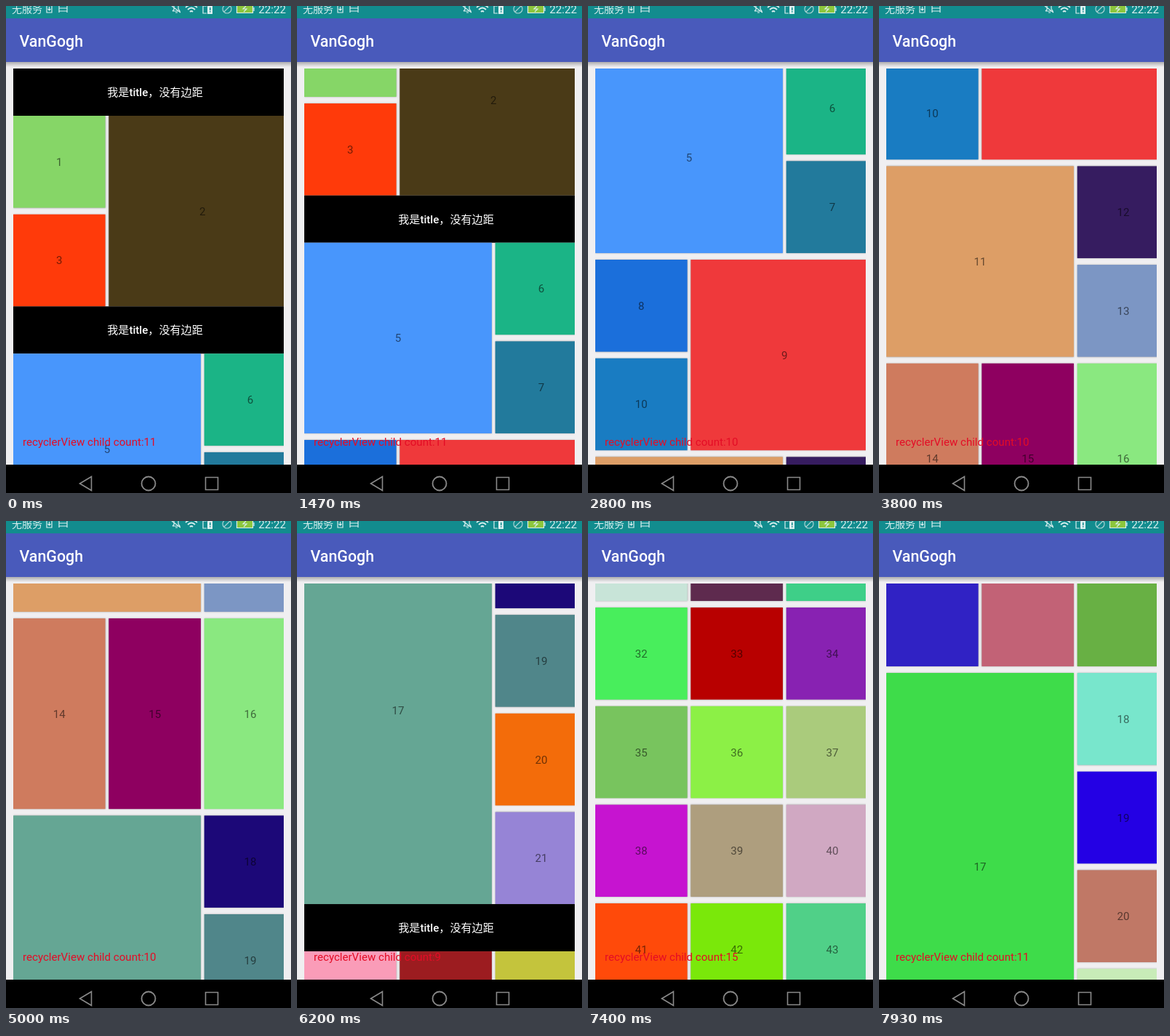
Recreate the animation shown at these times as an HTML page with a canvas. Size 392 px wide and 670 px high, loop 8 s.

```html
<!DOCTYPE html>
<html lang="zh-CN">
<head>
<meta charset="utf-8">
<title>VanGogh</title>
<style>
  html, body { margin: 0; width: 100%; height: 100%; overflow: hidden; background: #f0eff1; }
  canvas { display: block; }
</style>
</head>
<body>
<canvas id="stage" width="392" height="670"></canvas>
<script>
const ctx = document.getElementById('stage').getContext('2d');
const FONT = 'Roboto, "Noto Sans CJK SC", "Noto Sans CJK", sans-serif';
const LOOP = 8000, STEP = 1000 / 15;
const LIST = { x: 10, y: 86, right: 382, bottom: 631 };
const CELL = 126.6, COL = 131.33, ROW = 135.67, TITLE_HEIGHT = 65;

// Each block lists its cells as [column, row, columns, rows].
const BLOCKS = {
  bigRight: [[0, 0, 1, 1], [1, 0, 2, 2], [0, 1, 1, 1]],
  bigLeft: [[0, 0, 2, 2], [2, 0, 1, 1], [2, 1, 1, 1]],
  tall: [[0, 0, 1, 2], [1, 0, 1, 2], [2, 0, 1, 2]],
  tower: [[0, 0, 2, 4], [2, 0, 1, 1], [2, 1, 1, 1], [2, 2, 1, 1], [2, 3, 1, 1]],
  row: [[0, 0, 1, 1], [1, 0, 1, 1], [2, 0, 1, 1]]
};
const ORDER = ['title', 'bigRight', 'title', 'bigLeft', 'bigRight', 'bigLeft', 'tall', 'tower', 'title',
  ...Array(9).fill('row')];

const hexList = text => text.trim().split(/\s+/).map(hex => '#' + hex);
const COLORS = hexList(`
  000000 86d667 4a3a17 ff3a0a 000000 4896fc 1bb486 227a9c 1b6fdb ef393b 197cc2
  dd9e66 361c60 7c96c4 cf7b5e 8e0060 8ae880 65a694 1c0878 50868a f36c0a 9684d6
  000000 fa9cb8 9c1c20 c4c43c 5c8ed0 e0b050 7a4a98 c8e4d8 5e2a4e 3ecf88
  48ee5c b80000 8822b2 78c45e 8cf046 aacb7c c614d0 ae9e7e d0a8c2 ff4a0a 7ae80a 50d088`);
// Cells get fresh colours when they are bound again on the way back.
const REBOUND_FROM = 14, REBOUND_TO = 28, TURN = 111;
const REBOUND = hexList(`
  3022c4 c26276 68b044 3edc4a 78e6cc 2400e4 c07866 c8ecb8
  000000 5a9ad8 d8b23c 8a3ca0 3fae9a e07048 70709c`);

const SCROLL = [[0, 0], [22, 152.6], [42, 400.6], [57, 800.6], [93, 1570.2], [111, 2450.2], [119, 1354.6]];
const COUNTS = [[0, 11], [32, 10], [80, 9], [97, 12], [104, 15], [114, 12], [117, 11]];

function buildItems() {
  const items = [];
  let top = LIST.y;
  ORDER.forEach((kind, i) => {
    if (kind === 'title') {
      items.push({ title: true, x: LIST.x, y: top, w: 390, h: TITLE_HEIGHT });
      top += TITLE_HEIGHT;
      return;
    }
    const cells = BLOCKS[kind];
    for (const [col, row, cols, rows] of cells) {
      items.push({
        x: LIST.x + col * COL, y: top + row * ROW,
        w: CELL + (cols - 1) * COL, h: CELL + (rows - 1) * ROW
      });
    }
    top += Math.max(...cells.map(c => c[1] + c[3])) * ROW;
    if (ORDER[i + 1] === 'title') top -= ROW - CELL;
  });
  return items;
}
const items = buildItems();

const slopes = SCROLL.slice(1).map(([f, s], i) => (s - SCROLL[i][1]) / (f - SCROLL[i][0]));
function tangent(i) {
  if (i === 0) return 0;
  const a = slopes[i - 1], b = slopes[i];
  if (b === undefined) return a;
  return a * b > 0 ? 2 * a * b / (a + b) : 0;
}
function scrollAt(frame) {
  let i = 0;
  while (i < SCROLL.length - 2 && frame >= SCROLL[i + 1][0]) i++;
  const [f0, s0] = SCROLL[i], [f1, s1] = SCROLL[i + 1];
  const span = f1 - f0, u = Math.min(1, (frame - f0) / span);
  const ease = u * u * (3 - 2 * u);
  return s0 + (s1 - s0) * ease
    + span * (tangent(i) * u * (1 - u) ** 2 - tangent(i + 1) * u * u * (1 - u));
}

function text(value, x, y, color, size = 15, align = 'center', weight = 400) {
  ctx.font = `${weight} ${size}px ${FONT}`;
  ctx.textAlign = align;
  ctx.fillStyle = color;
  ctx.fillText(value, x, y);
}
function box(x, y, w, h, color) {
  ctx.fillStyle = color;
  ctx.fillRect(x, y, w, h);
}
function line(path, color, width) {
  ctx.strokeStyle = color;
  ctx.lineWidth = width;
  ctx.stroke(new Path2D(path));
}

function colorOf(index, frame) {
  const rebound = frame > TURN && index >= REBOUND_FROM && index <= REBOUND_TO;
  return rebound ? REBOUND[index - REBOUND_FROM] : COLORS[index] || '#8098b0';
}

function drawList(frame) {
  const scroll = scrollAt(frame);
  ctx.save();
  ctx.beginPath();
  ctx.rect(LIST.x, LIST.y, LIST.right - LIST.x, LIST.bottom - LIST.y);
  ctx.clip();
  items.forEach((item, index) => {
    const top = item.y - scroll;
    if (top + item.h < LIST.y || top > LIST.bottom) return;
    const cx = item.x + item.w / 2, baseline = top + item.h / 2 + 5.5;
    ctx.shadowColor = 'rgba(0,0,0,.3)';
    ctx.shadowBlur = item.title ? 0 : 2;
    box(item.x, top, item.w, item.h, colorOf(index, frame));
    ctx.shadowColor = 'transparent';
    if (item.title) text('我是title，没有边距', cx, baseline, '#fff', 15.1, 'center', 500);
    else text(index, cx, baseline, 'rgba(0,0,0,.54)', 15.1);
  });
  ctx.restore();
}

function drawStatusBar() {
  const white = '#d8eeee';
  box(0, 0, 392, 17, '#128c8e');
  text('无服务', 8, 9, white, 14, 'left', 500);
  line('M56 -1V9H63V-1M59.5 1V6M57.5 4L59.5 6L61.5 4', white, 1.2);
  line('M73 0V9M84 0V9M73 3H84M73 7H84', white, 1.2);
  line('M229 7H239L237 4V0M231 0V5L229 7M233 9H236M228 0L240 9', white, 1.2);
  line('M247 2Q255 -5 263 2M250 5Q255 0 260 5M253 8Q255 6 257 8', white, 1.8);
  line('M276 0H271V10H276', white, 1.2);
  box(277, 0, 7, 11, white);
  box(280, 2, 1.5, 4, '#128c8e');
  box(280, 7, 1.5, 1.5, '#128c8e');
  line('M310 4A6 6 0 1 1 298 4A6 6 0 1 1 310 4M300 8L308 0', '#a8d2d2', 1.2);
  box(318, 0, 21, 9, '#8cc63c');
  line('M317.5 -1V9.5H339.5V-1M341 2V7', white, 1.2);
  line('M330 0L326 4H331L327 8', white, 1.2);
  text('22:22', 385, 9.5, white, 15.2, 'right');
}

function drawAppBar() {
  const shadow = ctx.createLinearGradient(0, 77, 0, 84);
  shadow.addColorStop(0, 'rgba(0,0,0,.28)');
  shadow.addColorStop(1, 'rgba(0,0,0,0)');
  box(0, 77, 392, 7, shadow);
  box(0, 17, 392, 60, '#495abb');
  text('VanGogh', 18.5, 55.5, '#fff', 21.4, 'left', 500);
}

function drawNavBar() {
  box(0, 631, 392, 39, '#000');
  line('M117.5 647.5V666.5L101.5 657Z', '#8a8a8a', 1.6);
  line('M205.5 657A9.5 9.5 0 1 1 186.5 657A9.5 9.5 0 1 1 205.5 657Z', '#8a8a8a', 1.8);
  line('M274.5 648.5H291.5V665.5H274.5Z', '#8a8a8a', 1.6);
}

function draw(now) {
  const frame = Math.min(119, Math.floor((now % LOOP) / STEP + 0.06));
  const count = COUNTS.filter(([start]) => start <= frame).pop()[1];
  box(0, 0, 392, 670, '#f0eff1');
  drawList(frame);
  text('recyclerView child count:' + count, 23, 605, '#e40c26', 15.1, 'left');
  drawAppBar();
  drawStatusBar();
  drawNavBar();
}

const start = performance.now();
function tick() {
  draw(performance.now() - start);
  requestAnimationFrame(tick);
}
tick();
</script>
</body>
</html>
```
